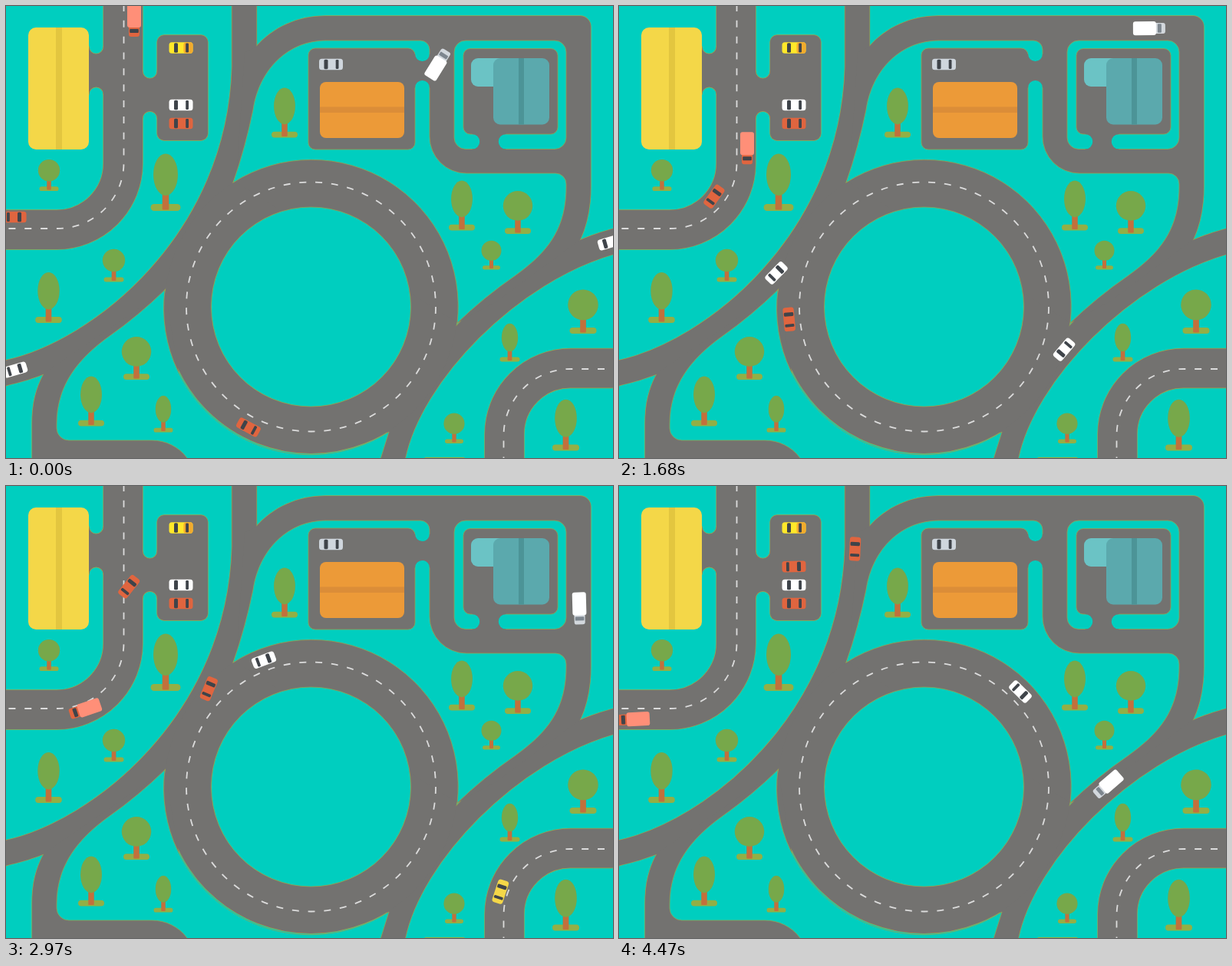
Write an HTML page that moves like this. It is 791x589 px and loops after 4500 ms.

```html
<!DOCTYPE html>
<html lang="en">
<head>
<meta charset="utf-8">
<title>Town traffic</title>
<style>
html, body { margin: 0; width: 100%; height: 100%; overflow: hidden; background: #00cebf; }
svg { display: block; width: 100vw; height: 100vh; }
</style>
</head>
<body>
<svg id="town" viewBox="0 0 791 589" xmlns="http://www.w3.org/2000/svg"></svg>
<script>
const LOOP = 4500;
const GRASS = '#00cebf', ROAD = '#737270', EDGE = '#a3a24a', DARK = '#3f444a', RED = '#e0653f';
const town = document.getElementById('town');

const rect = (x, y, w, h, r, fill) =>
  `<rect x="${x}" y="${y}" width="${w}" height="${h}" rx="${r}" fill="${fill}"/>`;
const stroke = (d, width, color, extra = '') =>
  `<path d="${d}" fill="none" stroke="${color}" stroke-width="${width}" ${extra}/>`;
const area = (d, edge = 0.7, fill = ROAD) =>
  `<path d="${d}" fill="${fill}" stroke="${EDGE}" stroke-width="${edge}"/>`;
const island = d => area(d, 0.7, GRASS);
const dashes = d => stroke(d, 1.8, '#dcdcdc', 'stroke-dasharray="9 11.84"');

const box = (x1, y1, x2, y2, r) =>
  `M${x1 + r},${y1}H${x2 - r}A${r},${r} 0 0 1 ${x2},${y1 + r}V${y2 - r}A${r},${r} 0 0 1 ${x2 - r},${y2}` +
  `H${x1 + r}A${r},${r} 0 0 1 ${x1},${y2 - r}V${y1 + r}A${r},${r} 0 0 1 ${x1 + r},${y1}Z`;
const circle = r => `M${397.5 + r},392A${r},${r} 0 1 1 ${397.5 - r},392A${r},${r} 0 1 1 ${397.5 + r},392Z`;

// Short driveway between two vertical sides, with rounded kerbs.
function driveway(x1, x2, y1, y2) {
  const r = (x2 - x1) / 2, a = y1 - r, b = y2 + r;
  return `M${x2 + 3},${a}H${x2}A${r},${r} 0 0 1 ${x1},${a}H${x1 - 3}V${b}H${x1}A${r},${r} 0 0 1 ${x2},${b}H${x2 + 3}Z`;
}

// Lanes are [centre line, width]; all edges lie below all asphalt so that crossings merge.
function network(lanes, areas) {
  return lanes.map(([d, w]) => stroke(d, w + 1.3, EDGE)).join('') + areas.map(d => area(d, 1.3)).join('') +
    lanes.map(([d, w]) => stroke(d, w, ROAD)).join('') + areas.map(d => area(d, 0)).join('');
}

// A tree grows from the size of its patch of grass.
function tree(x, bottom, half, tall) {
  const h = half * 0.46, w = half * 0.44, y = bottom - half * (tall ? 2.42 : 2.15);
  const [rx, ry] = tall ? [0.82, 1.4] : [1.13, 1.14];
  return rect(x - half, bottom - h, half * 2, h, h / 2, '#93af45') +
    rect(x - w / 2, y, w, bottom - 1.5 - y, 1, '#c2703c') +
    `<ellipse cx="${x}" cy="${y}" rx="${half * rx}" ry="${half * ry}" fill="#77a84a"/>`;
}

// Vehicles are drawn around 0,0 facing right.
const car = (color, back = '') => rect(-15.5, -7.2, 31, 14.4, 3.5, color) +
  (back && rect(-15.5, -7.2, 12, 14.4, 3.5, back)) +
  rect(4, -6.2, 5, 12.4, 1.5, DARK) + rect(-10, -6, 3.8, 12, 1.2, DARK);
const truck = (load, cab, glass) => rect(6, -7, 15, 14, 3, cab) + rect(11, -5.8, 5, 11.6, 1, glass) +
  rect(-21, -9, 30, 18, 3, load);
const parked = (x, y, art) => `<g transform="translate(${x} ${y}) rotate(180)">${art}</g>`;

const lanes = [
  ['M-10,481L0,478C124,452 304,306 310.5,80V-10', 32],
  ['M812,301L791,307C657,344 525,480 504,589L499,605', 32],
  [circle(160.5), 61],
  ['M152.5,-10V205A86.5,86.5 0 0 1 66,291.5H-10', 51],
  ['M801,472H735.5A86,86 0 0 0 649.5,558V600', 51]
];
const areas = [
  'M326,53C348,28 380,13 416,13H748A14,14 0 0 1 762,27V235Q762,275 748,305L640,385L588,413L300,230L311,60Z',
  'M50,478C38,500 34,520 34,545V600H240V566L207,370Z',
  box(197, 38, 263, 175, 9),
  driveway(108, 127, 62.5, 105.5),
  driveway(178, 197, 94.5, 137)
];
const islands = [
  circle(130),
  'M322,135C330,82 368,45 417,45H540A12,12 0 0 1 552,57V170A48,48 0 0 0 600,218H716A14,14 0 0 1 730,232' +
    'C731,292 704,322 664,351Q622,380 588,413A191,191 0 0 0 296,230Q312,184 322,135Z',
  box(584, 45, 730, 186.5, 15),
  'M66,545C66,495 93,460 135,430Q172,404 207,370A191,191 0 0 0 499,555L485,600H242L236,589' +
    'C225,574 208,566 190,566H82A16,16 0 0 1 66,550Z'
];
const lots = area(box(394, 55, 533, 187, 9)) + area(driveway(533, 552, 72, 97), 0) +
  area(box(596, 55.5, 719, 167, 9)) +
  area('M607.5,164V167A9.6,9.6 0 0 1 607.5,186.5V190H651.5V186.5A9.6,9.6 0 0 1 651.5,167V164Z', 0);

const roundTrees = [[56, 241, 12.5], [140.5, 359.5, 13], [170, 487, 17], [667, 297, 17],
  [632.5, 343.5, 11.5], [752, 427, 17.5], [584, 570, 12]];
const tallTrees = [[208, 267, 19.5], [363, 171.5, 17], [55.5, 413, 17.3], [111, 547.5, 17],
  [205, 555.5, 12.5], [594, 292.5, 17], [656.5, 463.5, 13], [729.5, 579.5, 17.5]];

// Each trip follows a path between two times; pull and swing shape its speed.
const traffic = [
  { art: truck('#ff8f78', RED, DARK), pull: -0.15, swing: 1,
    path: 'M167,19V205C167,280 105,300 19,304' },
  { art: car(RED), to: 3700, pull: -0.4, swing: 0.2,
    path: 'M11,275H60C112,276 130,248 138,215C141,190 138,129 190,110Q208,105 228,105' },
  { art: car('#fff'), pull: -0.02, swing: 0.08,
    path: 'M12,474C95,450 148,406 206,347C235,318 257,274 297,247A177,177 0 0 1 523,268' },
  { art: car(RED), pull: -0.18, swing: 0.08,
    path: 'M316,549A177,177 0 0 1 248,298C263,274 290,200 300,155Q306,120 307.5,82' },
  { art: car('#fff'), to: 2620, pull: -0.38, swing: 0.08,
    path: 'M787,308C657,344 525,480 504,589L497,620' },
  { art: car('#f4d748'), from: 2385,
    path: 'M634,606C636,540 644,466 740,462H815' },
  { art: truck('#fff', '#d3d8dd', '#7d868e'), pull: -0.43, swing: -0.24,
    path: 'M563,76C578,52 590,31 616,29.5L704,29C735,30 742,60 745,105' +
      'Q748,160 748,217C748,255 743,275 731,299C709,338 670,360 637,389' }
];

town.innerHTML =
  rect(0, 0, 791, 589, 0, GRASS) + network(lanes, areas) + islands.map(island).join('') + lots +
  dashes('M153.5,-2V205A86,86 0 0 1 66,290H-5') + dashes(circle(162.5)) +
  dashes('M780,473H736A87,87 0 0 0 648.5,558V595') +
  rect(29, 28, 79, 159, 10, '#f4d748') + rect(65, 28, 8, 159, 0, '#e3c63f') +
  rect(409, 99, 110, 73, 8, '#ec9a38') + rect(409, 131.5, 110, 7.5, 0, '#db8d38') +
  rect(606, 68, 54, 37, 9, '#6bc3c5') + rect(635, 68, 73, 86.5, 9, '#5ba9ad') + rect(668, 68, 7, 86.5, 0, '#4c9497') +
  roundTrees.map(t => tree(...t, false)).join('') + tallTrees.map(t => tree(...t, true)).join('') +
  rect(545, 588, 53, 6, 2, '#93af45') +
  parked(228, 54.5, car('#ffe82a', '#f2ab2e')) + parked(228, 129, car('#fff')) +
  parked(228, 153, car(RED)) + parked(423.5, 76, car('#cfd6dd')) +
  traffic.map(v => `<g class="vehicle">${v.art}</g>`).join('');

const nodes = town.querySelectorAll('.vehicle');
const tracks = traffic.map(v => {
  const track = document.createElementNS(town.namespaceURI, 'path');
  track.setAttribute('d', v.path);
  return track;
});

function draw(t) {
  traffic.forEach(({ from = 0, to = 4470, pull = 0, swing = 0 }, i) => {
    const track = tracks[i], length = track.getTotalLength();
    const u = Math.min(1, Math.max(0, (t - from) / (to - from)));
    const s = length * (u + u * (1 - u) * (pull + swing * u));
    const p = track.getPointAtLength(s);
    const rear = track.getPointAtLength(Math.max(0, s - 6));
    const front = track.getPointAtLength(Math.min(length, s + 6));
    const angle = Math.atan2(front.y - rear.y, front.x - rear.x) * 180 / Math.PI;
    nodes[i].setAttribute('transform', `translate(${p.x.toFixed(2)} ${p.y.toFixed(2)}) rotate(${angle.toFixed(2)})`);
  });
}

const start = performance.now();
function tick() {
  draw((performance.now() - start) % LOOP);
  requestAnimationFrame(tick);
}
draw(0);
requestAnimationFrame(tick);
</script>
</body>
</html>
```
